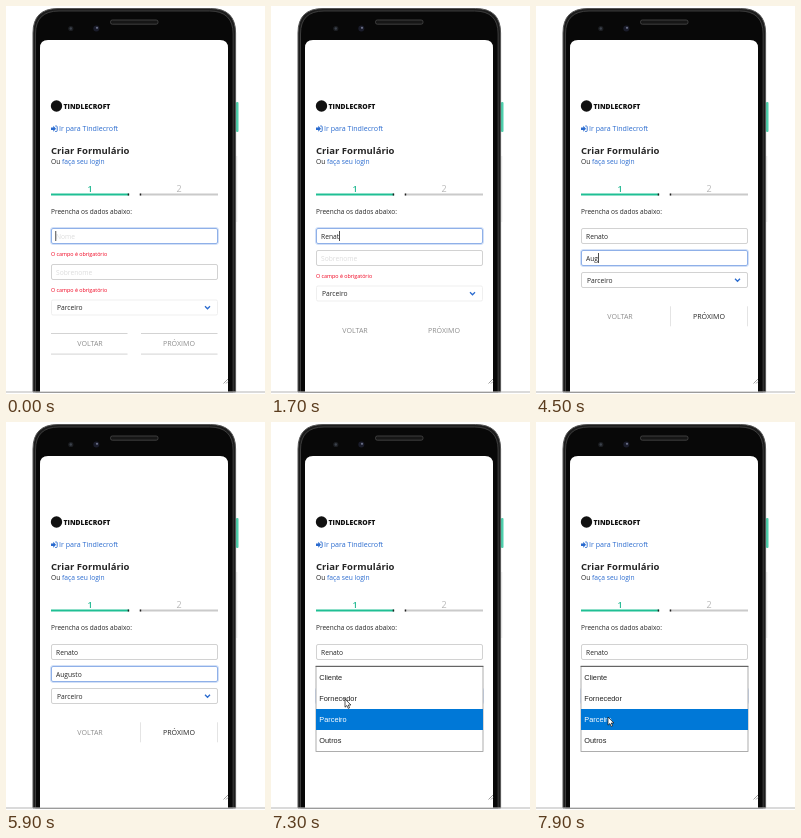
Write an HTML page that moves like this. It is 259 by 388 pixels and loops after 8 s.

```html
<!DOCTYPE html>
<html lang="pt">
<head>
<meta charset="utf-8">
<title>Criar Formulário</title>
<style>
html, body { margin: 0; width: 100%; height: 100%; overflow: hidden; background: #fff; }
svg { display: block; width: 259px; height: 388px; }
text { font-family: "Open Sans", "Noto Sans", sans-serif; font-size: 6.7px; font-weight: 500; fill: #262626; }
.logo { font-size: 6.8px; font-weight: 800; fill: #111; }
.title { font-size: 9.5px; font-weight: 700; }
.link { fill: #2a6bcf; }
.label { font-size: 6.5px; }
.error { font-size: 5.35px; fill: #f0001e; }
.hint { fill: #dcdcdc; }
.mid { text-anchor: middle; }
.step { font-size: 9px; }
.btn { font-size: 7.1px; fill: #8e8e8e; }
.menu text { font-family: "Liberation Sans", Arial, sans-serif; font-size: 7.35px; font-weight: 400; fill: #222; }
.box { fill: #fff; stroke: #d2d2d2; }
.faint .box { stroke: #efefef; }
.glow { fill: none; stroke: #3273dc; stroke-opacity: .22; }
.focus .box { stroke: #8fb0e8; }
.rule { stroke: #c8c8c8; stroke-width: .8; }
</style>
</head>
<body>
<svg viewBox="0 0 259 388">
  <rect width="259" height="388" fill="#fff"/>
  <!-- phone -->
  <rect x="230" y="96" width="2.500" height="30" rx="1" fill="#4fd0ad"/>
  <rect x="230" y="150" width="1.400" height="66" fill="#f0f0f0"/>
  <path d="M27 386V27Q27 2.500 52 2.500H204.600Q229.600 2.500 229.600 27V386Z" fill="#1c1c1c" stroke="#555"/>
  <path d="M29.500 386V28Q29.500 5 53 5H203.600Q227.100 5 227.100 28V386Z" fill="#080808" stroke="#484848" stroke-width=".8"/>
  <path d="M34 386V42Q34 34 42 34H214Q222 34 222 42V386Z" fill="#fff"/>
  <circle cx="64.800" cy="22.500" r="2.600" fill="#1c1e22"/>
  <circle cx="64.800" cy="22.500" r="1.200" fill="#3c424c"/>
  <circle cx="90.300" cy="22.500" r="3" fill="#1a1c2a"/>
  <circle cx="91" cy="21.800" r="1.100" fill="#6b7088"/>
  <rect x="104.500" y="14" width="47.500" height="4.200" rx="1.800" fill="#161616" stroke="#4a4a4a" stroke-width=".8"/>
  <path d="M0 386H259" stroke="#b5b5b5" stroke-width="1"/>
  <path d="M217.500 377.500L222 373M220 377.500L222 375.500" stroke="#777" stroke-width=".7"/>

  <!-- heading -->
  <circle cx="50.500" cy="100" r="5.700" fill="#111"/>
  <text class="logo" x="57.500" y="102.500">TINDLECROFT</text>
  <g fill="#2a6bcf">
    <path d="M45 121.600H47.300V119.700L50 122.700L47.300 125.700V123.900H45Z"/>
    <path d="M49.200 120H50.400Q51.200 120 51.200 120.800V124.700Q51.200 125.500 50.400 125.500H49.200" fill="none" stroke="#2a6bcf" stroke-width=".9"/>
  </g>
  <text class="link" x="53" y="125.200" style="font-size:7.100px">Ir para Tindlecroft</text>
  <text class="title" x="45" y="148">Criar Formulário</text>
  <text x="45" y="157.700">Ou <tspan class="link">faça seu login</tspan></text>

  <!-- steps -->
  <text class="step mid" x="84" y="185.700" style="fill:#1fb890;font-weight:600">1</text>
  <text class="step mid" x="173" y="185.700" style="fill:#b8b8b8">2</text>
  <path d="M45 188.500H123" stroke="#1fbf94" stroke-width="2"/>
  <path d="M134 188.500H212" stroke="#cacaca" stroke-width="2"/>
  <path d="M121.700 188.500H123.200M133.700 188.500H135.200" stroke="#222" stroke-width="1.800"/>
  <text class="label" x="45" y="208.200">Preencha os dados abaixo:</text>

  <!-- form -->
  <g id="first"></g>
  <text id="error1" class="error" x="45" y="249.800">O campo é obrigatório</text>
  <g id="last"></g>
  <text id="error2" class="error" x="45">O campo é obrigatório</text>
  <g id="select">
    <text x="51" y="2.600">Parceiro</text>
    <path d="M199 -1.200L201.500 1.300L204 -1.200" fill="none" stroke="#2a6bcf" stroke-width="1.300"/>
  </g>
  <g id="buttons">
    <path id="rules" class="rule" d="M45 -10.300H121.500M45 10.300H121.500M135 -10.300H211.500M135 10.300H211.500"/>
    <path id="sides" d="M134.500 -10V10M211.500 -10V10" stroke="#e4e4e4"/>
    <text class="btn mid" x="84" y="2.500">VOLTAR</text>
    <text id="next" class="btn mid" x="173" y="2.500">PRÓXIMO</text>
  </g>

  <!-- options -->
  <g id="menu" class="menu">
    <rect x="45" y="244.500" width="167" height="85" fill="#fff" stroke="#999" stroke-width=".8"/>
    <path d="M44.600 244.300H212.400" stroke="#555" stroke-width="1"/>
    <rect id="bar" x="45" width="167" height="21" fill="#0078d7"/>
  </g>
  <path id="pointer" d="M0 0V8.200L1.900 6.500L3.200 9.400L4.600 8.800L3.300 6H5.900Z" fill="#fff" stroke="#111" stroke-width=".7"/>
</svg>
<script>
const LOOP = 8000;
const NS = "http://www.w3.org/2000/svg";
const $ = id => document.getElementById(id);
const make = (tag, attrs, text = "") => {
  const el = document.createElementNS(NS, tag);
  for (const k in attrs) el.setAttribute(k, attrs[k]);
  el.textContent = text;
  return el;
};
const show = (el, on) => el.setAttribute("visibility", on ? "visible" : "hidden");
const move = (el, x, y) => el.setAttribute("transform", `translate(${x} ${y})`);
const within = (t, spans) => spans.some(([a, b]) => t >= a && t < b);

// Puts the shared input frame behind a group and returns its focus ring.
function addFrame(group) {
  const glow = make("rect", { class: "glow", x: 44.5, y: -8.5, width: 168, height: 17, rx: 2.5 });
  const box = make("rect", { class: "box", x: 45.5, y: -7.5, width: 166, height: 15, rx: 1.5 });
  group.prepend(glow, box);
  return glow;
}

// Each key time reveals one more letter; caret lists the spans in which it shows.
const fields = [
  { id: "first", hint: "Nome", value: "Renato", keys: [900, 1200, 1400, 1500, 1700, 1800],
    focus: [0, 3400], caret: [[0, 600], [900, 2000], [2600, 3100]] },
  { id: "last", hint: "Sobrenome", value: "Augusto", keys: [3900, 4300, 4500, 4700, 4900, 5500, 5700],
    focus: [3400, 7200], caret: [[3400, 5000], [5400, 5900], [6400, 6900]] }
];
for (const f of fields) {
  f.el = $(f.id);
  f.glow = addFrame(f.el);
  f.text = make("text", { x: 50, y: 2.7 });
  f.bar = make("rect", { y: -5, width: .8, height: 10, fill: "#222" });
  f.el.append(f.text, f.bar);
}
const selectGlow = addFrame($("select"));

const options = ["Cliente", "Fornecedor", "Parceiro", "Outros"].map((name, i) =>
  $("menu").appendChild(make("text", { x: 48.3, y: 257.8 + i * 21.1 }, name)));

const path = [[6600, 96, 292], [7000, 74, 277], [7600, 74, 277], [7900, 72, 295]];
function pointerAt(t) {
  const i = path.findIndex(p => p[0] > t);
  if (i < 0) return path[path.length - 1].slice(1);
  if (i === 0) return path[0].slice(1);
  const [t0, x0, y0] = path[i - 1], [t1, x1, y1] = path[i];
  const k = (t - t0) / (t1 - t0);
  return [x0 + (x1 - x0) * k, y0 + (y1 - y0) * k];
}

function drawField(f, t, y) {
  const n = f.keys.filter(k => t >= k).length;
  const active = within(t, [f.focus]);
  move(f.el, 0, y);
  f.el.setAttribute("class", active ? "focus" : "");
  show(f.glow, active);
  f.text.textContent = n ? f.value.slice(0, n) : f.hint;
  f.text.setAttribute("class", n ? "" : "hint");
  const end = n ? f.text.getComputedTextLength() : -.6;
  f.bar.setAttribute("x", 50 + end);
  show(f.bar, within(t, f.caret));
}

function draw(t) {
  const named = t >= 1100, valid = t >= 4000, open = t >= 7200;
  drawField(fields[0], t, 230);
  drawField(fields[1], t, named ? 252 : 266);
  show($("error1"), !named);
  show($("error2"), !valid);
  $("error2").setAttribute("y", named ? 271.8 : 285.5);

  move($("select"), 0, valid ? 274 : named ? 287.5 : 301.5);
  $("select").setAttribute("class", open ? "focus" : valid ? "" : "faint");
  show(selectGlow, open);
  move($("buttons"), 0, valid ? 310.3 : named ? 324 : 337.8);
  show($("rules"), !named);
  show($("sides"), valid);
  $("next").style.fill = valid ? "#262626" : "";

  const chosen = t >= 7400 && t < 7800 ? 1 : 2;
  $("menu").style.display = open ? "" : "none";
  $("bar").setAttribute("y", 287 + (chosen - 2) * 21.1);
  options.forEach((o, i) => o.style.fill = i === chosen ? "#fff" : "");
  show($("pointer"), t >= 6600);
  move($("pointer"), ...pointerAt(t));
}

const start = performance.now();
function tick() {
  draw((performance.now() - start) % LOOP);
  requestAnimationFrame(tick);
}
tick();
</script>
</body>
</html>
```
